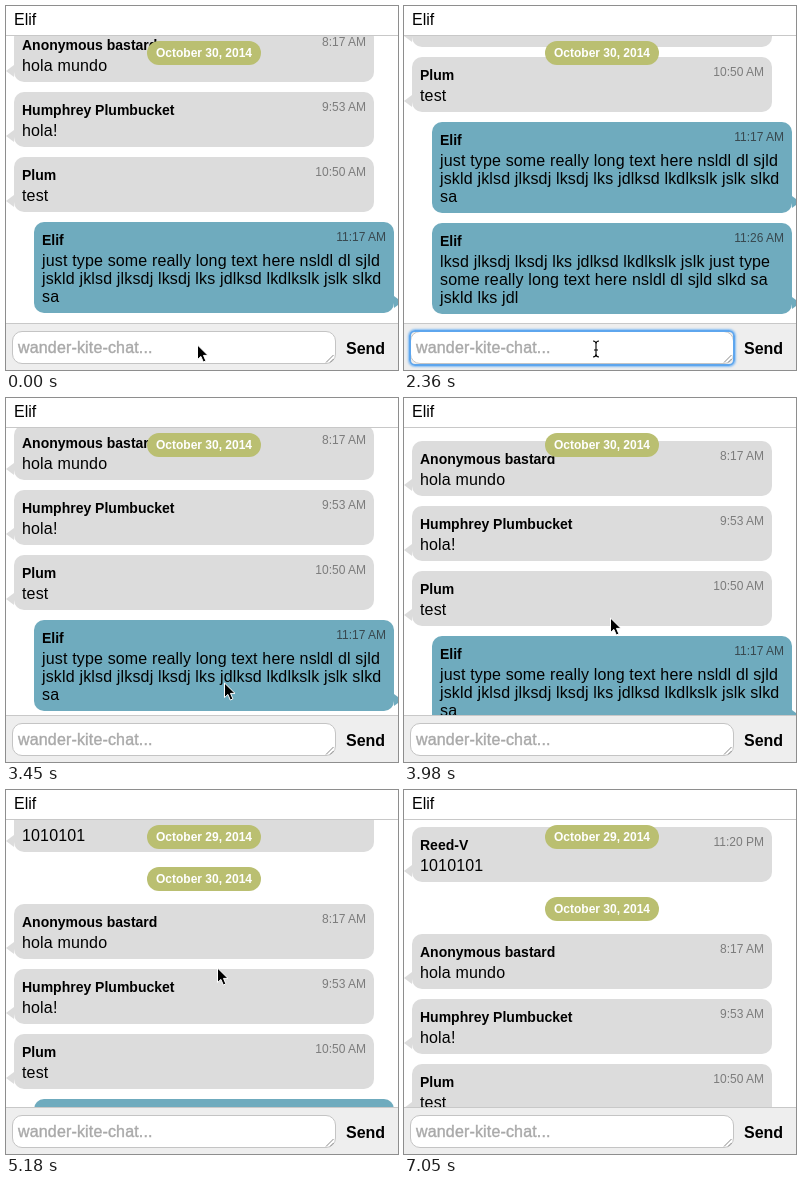
An HTML page that plays this animation: 392 px wide and 364 px high, repeating every 7310 ms.

```html
<!DOCTYPE html>
<html lang="en">
<head>
<meta charset="utf-8">
<title>Chat</title>
<style>
html, body { margin: 0; width: 100%; height: 100%; overflow: hidden; background: #fff; }
body { font: 16px/18px "Liberation Sans", Arial, sans-serif; color: #000; cursor: default; }
#stage { position: relative; width: 392px; height: 364px; overflow: hidden; }
#stage div, #stage span, #stage svg { position: absolute; }
#list { left: 0; top: 0; width: 392px; height: 364px; }

.bubble { left: 8px; top: 0; width: 360px; border-radius: 10px; background: #dcdcdc; }
.bubble.mine { left: 28px; background: #6fabbe; }
.bubble::before {
  content: ""; position: absolute; left: -8px; bottom: 5px; width: 8px; height: 12px;
  background: inherit; clip-path: polygon(100% 0, 0 50%, 100% 100%);
}
.bubble.mine::before { left: 360px; clip-path: polygon(0 0, 100% 50%, 0 100%); }
.name { left: 8px; top: 10px; font: bold 14px/16px "Liberation Sans", Arial, sans-serif; white-space: nowrap; }
.time { right: 8px; top: 8px; font-size: 12px; line-height: 14px; color: #7c7c7c; white-space: nowrap; }
.mine .time { color: #38484f; }
.text { left: 8px; top: 30px; width: 344px; letter-spacing: .16px; }

.pill {
  left: 141px; top: -12px; width: 114px; height: 24px; border-radius: 12px; background: #babf71;
  color: #fff; font: bold 12px/24px "Liberation Sans", Arial, sans-serif;
  text-align: center; white-space: nowrap;
}
#head { left: 0; top: 0; width: 392px; height: 29px; background: #fff; border-bottom: 1px solid #c8c8c8; }
#head span { left: 8px; top: 5px; }
#bar { left: 0; bottom: 0; width: 392px; box-sizing: border-box; border-top: 1px solid #c8c8c8; background: #eee; }
#field {
  left: 6px; top: 7px; bottom: 6px; width: 322px; border: 1px solid #c4c4c4;
  border-radius: 10px; background: #fff;
}
#ring {
  left: 5px; top: 6px; bottom: 4px; width: 322px; border: 2px solid #5ea6ee; border-radius: 6px;
  box-shadow: 0 0 2px 1px #86bdf3;
}
#hint, #draft { left: 12px; bottom: 13px; width: 306px; letter-spacing: .16px; }
#hint { color: #a9a9a9; -webkit-text-stroke: .4px #a9a9a9; }
#caret { left: 12px; bottom: 13px; width: 1px; height: 18px; background: #000; }
#grip { left: 319px; bottom: 7px; }
#send { left: 340px; bottom: 12px; font-weight: bold; }
#mouse { left: 0; top: 0; overflow: visible; }
</style>
</head>
<body>
<div id="stage">
  <div id="list"></div>
  <div id="head"><span>Elif</span></div>
  <div id="bar">
    <div id="field"></div>
    <div id="ring"></div>
    <div id="hint">wander-kite-chat...</div>
    <div id="draft"></div>
    <div id="caret"></div>
    <svg id="grip" width="9" height="9"><path d="M1 8.5 8.5 1M5 8.5 8.5 5" stroke="#888" fill="none"/></svg>
    <span id="send">Send</span>
  </div>
  <svg id="mouse" width="14" height="20">
    <defs><path id="stem" d="M-2-4Q1-4 1-1V9Q1 12-2 12M4-4Q1-4 1-1M1 9Q1 12 4 12M-1 5H3"/></defs>
    <path id="arrow" d="M.5 0V14.6L3.9 11.4 6.3 17 8.9 15.9 6.5 10.4H11Z" fill="#000" stroke="#fff"/>
    <g id="beam" fill="none">
      <use href="#stem" stroke="#fff" stroke-width="2.4"/>
      <use href="#stem" stroke="#000" stroke-width="1.1"/>
    </g>
  </svg>
</div>
<script>
const LOOP = 7310, TICK = 57.5, LINE = 18, GAP = 10;
const FOCUS = 600, PASTE = 1130, SENT = 1610, BLUR = 2500, STILL = 6760;
const STICKY = 47, PILL_ROW = 42;
const $ = id => document.getElementById(id);

const longText = "just type some really long text here nsldl dl sjld " +
  "jskld jklsd jlksdj lksdj lks jdlksd lkdlkslk jslk slkd sa";
const draftText = "lksd jlksdj lksdj lks jdlksd lkdlkslk jslk just type some " +
  "really long text here nsldl dl sjld slkd sa jskld lks jdl";

const messages = [
  { name: "Jorns Gadget", time: "10:54 PM", text: "Hfhg" },
  { name: "Reed-V", time: "11:20 PM", text: "1010101" },
  { name: "Anonymous bastard", time: "8:17 AM", text: "hola mundo", newDay: true },
  { name: "Humphrey Plumbucket", time: "9:53 AM", text: "hola!" },
  { name: "Plum", time: "10:50 AM", text: "test" },
  { name: "Elif", time: "11:17 AM", text: longText, mine: true },
  { name: "Elif", time: "11:26 AM", text: draftText, mine: true }
];
const sent = messages[messages.length - 1];

function add(parent, cls, text = "") {
  const el = document.createElement("div");
  el.className = cls;
  el.textContent = text;
  return parent.appendChild(el);
}

// Stack the bubbles; y = 0 is the first message of the new day.
let y = -172;
for (const m of messages) {
  const height = 37 + LINE * (m.mine ? 3 : 1);
  if (m.newDay) y += PILL_ROW;
  m.y = y;
  m.el = add($("list"), m.mine ? "bubble mine" : "bubble");
  m.el.style.height = height + "px";
  for (const part of ["name", "time", "text"]) add(m.el, part, m[part]);
  y += height + GAP;
}
const dayBefore = add($("list"), "pill", "October 29, 2014");
const day = add($("list"), "pill", "October 30, 2014");
$("draft").textContent = draftText;

// Each flick of the list slows down towards the next point.
const scroll = [
  { t: SENT, y: 10 }, { t: 2450, y: -80 }, { t: 4020, y: 43 },
  { t: 4860, y: 200 }, { t: 5560, y: 77 }, { t: 6730, y: 144 }
];
const pointer = [
  { t: 2360, x: 191, y: 339 }, { t: 2640, x: 223, y: 225 }, { t: 3047, x: 225, y: 282 },
  { t: 3300, x: 222, y: 304 }, { t: 3967, x: 206, y: 220 }, { t: 4450, x: 208, y: 303 },
  { t: 4657, x: 209, y: 267 }, { t: 5250, x: 211, y: 165 }, { t: 5750, x: 210, y: 175 },
  { t: 6200, x: 212, y: 204 }, { t: 6600, x: 230, y: 366 }
];

const linear = p => p;
const easeOut = p => 1 - (1 - p) ** 2;
const within = (t, from, to) => t >= from && t < to;

function at(keys, t, axis, ease) {
  const i = keys.findIndex(k => k.t > t);
  if (i === 0) return keys[0][axis];
  if (i < 0) return keys[keys.length - 1][axis];
  const a = keys[i - 1], b = keys[i];
  return a[axis] + (b[axis] - a[axis]) * ease((t - a.t) / (b.t - a.t));
}

function place(el, x, y) {
  el.style.transform = `translate(${Math.round(x)}px, ${Math.round(y)}px)`;
}
function show(el, on) {
  el.style.visibility = on ? "visible" : "hidden";
}

function draw(now) {
  let t = now % LOOP;
  if (within(t, SENT, STILL)) t = SENT + TICK * Math.floor((t - SENT + 3) / TICK);

  // The pasted draft makes the input grow by two lines and lifts the list.
  const typing = within(t, PASTE, SENT);
  const grown = typing ? LINE * (t < PASTE + 60 ? 1 : 2) : 0;
  const top = t < SENT ? 21 - grown : Math.round(at(scroll, t, "y", easeOut));
  const entry = Math.max(0, 8 - (t - SENT) * 5 / TICK);

  for (const m of messages) place(m.el, 0, top + m.y + (m === sent ? entry : 0));
  show(sent.el, t >= SENT);
  place(day, 0, Math.max(STICKY, top - 25));
  place(dayBefore, 0, Math.min(STICKY, top - 66));

  $("bar").style.height = 47 + grown + "px";
  show($("draft"), typing);
  show($("hint"), !typing);
  show($("caret"), within(t, FOCUS, PASTE));
  show($("ring"), within(t, FOCUS, BLUR));
  $("ring").style.opacity = t < FOCUS + 60 ? 0.5 : 1;

  const beam = within(t, 360, 2450) || within(t, 5640, 5960);
  place($("mouse"), at(pointer, t, "x", linear), at(pointer, t, "y", linear));
  show($("mouse"), t < 6600);
  $("arrow").style.display = beam ? "none" : "";
  $("beam").style.display = beam ? "" : "none";
}

const start = performance.now();
function frame() {
  draw(performance.now() - start);
  requestAnimationFrame(frame);
}
frame();
</script>
</body>
</html>
```
